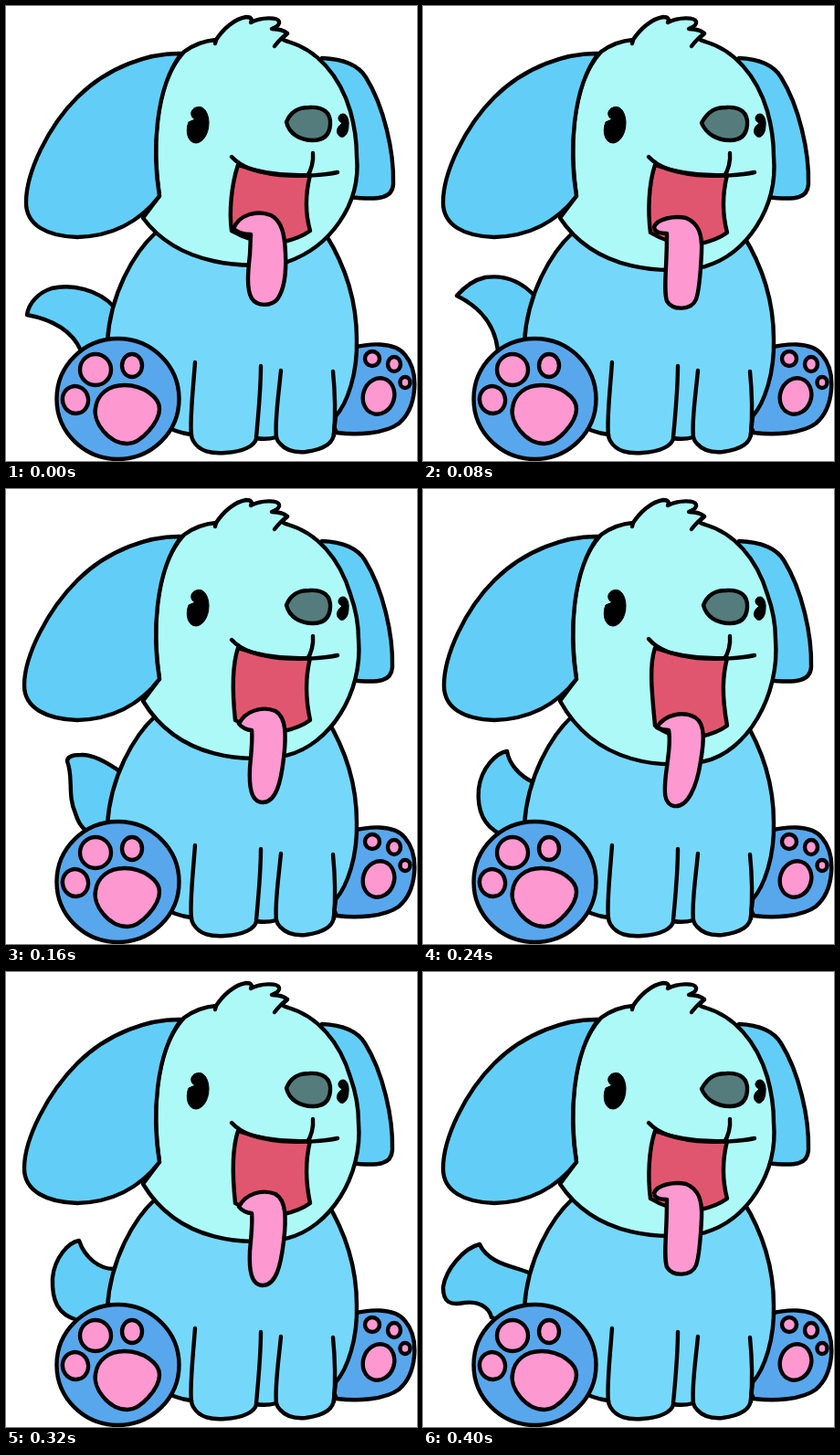
An HTML page for the animation above (0.48 s loop, 450 by 498 pixels).

```html
<!DOCTYPE html>
<html lang="en">
<head>
<meta charset="utf-8">
<title>Happy puppy</title>
<style>
  html, body { margin: 0; width: 100%; height: 100%; overflow: hidden; background: #fff; }
  svg { display: block; width: 100%; height: 100%; stroke: #000; stroke-width: 4.4; stroke-linecap: round; stroke-linejoin: round; }
</style>
</head>
<body>
<svg id="stage" viewBox="0 0 450 498"></svg>
<script>
const STEP = 80;
const JAW = [0, 1, 2, 3, 2, 1];
const EAR = '#62cef7', BODY = '#75d8fa', HEAD = '#adf9f8', PAW = '#58a7ec',
      PINK = '#fd98d0', MOUTH = '#e1566f', NOSE = '#547c7c';

const TAILS = [
  'M118 329C101 310 72 304 50 309C35 314 25 325 23 338C50 343 72 355 82 377',
  'M122 317C108 302 90 294 68 297C55 300 45 308 37 317C55 326 78 342 82 377',
  'M126 310C112 300 95 290 82 291C73 291 67 293 67 298C74 315 67 335 76 355C80 368 85 372 90 376',
  'M121 321C105 314 94 300 92 287C80 289 64 305 61 328C59 350 65 368 85 378',
  'M120 325C102 326 86 312 80 294C68 296 53 313 51 335C50 360 57 375 78 381',
  'M118 330C100 322 72 320 62 298C45 302 25 325 22 345C22 362 30 365 45 362C60 360 72 366 75 378'
];
const TONGUES = [
  'M249 244C255 228 275 223 290 229C302 235 305 250 306 270C307 290 305 310 297 321C290 329 275 329 269 320C263 310 265 290 267 272L268 250C262 250 256 249 249 244',
  'M253 242C256 233 275 229 288 232C302 238 306 250 305 270C304 290 303 310 299 321C294 333 274 334 267 323C263 310 267 290 267 249C260 249 253 248 253 242',
  'M255 257C262 243 280 237 295 243C307 250 307 270 304 295C301 320 296 343 281 343C268 343 266 325 267 305C269 285 270 272 269 264C264 264 258 261 255 257',
  'M256 261C265 246 285 243 298 250C309 257 308 275 304 298C300 325 290 349 275 347C263 345 264 330 266 312C269 290 271 275 269 264C264 264 260 263 256 261'
];

const path = (d, fill = 'none', extra = '') => `<path d="${d}" fill="${fill}" ${extra}/>`;
const oval = (x, y, rx, ry, fill = PINK, turn = 0) =>
  `<ellipse cx="${x}" cy="${y}" rx="${rx}" ry="${ry}" fill="${fill}" transform="rotate(${turn} ${x} ${y})"/>`;

const backPaw =
  path('M380 374C395 370 425 366 437 382C453 401 450 440 430 457C415 468 385 470 362 467L350 440', PAW) +
  oval(401, 386, 8, 8) + oval(425, 392, 7, 8) + oval(437, 412, 5.5, 6) + oval(408, 427, 17, 20, PINK, 18);

const body =
  path('M164 248C140 270 114 315 111 368L120 440L186 465Q194 468 203 469Q203 473 205 476C212 488 225 490 240 489' +
       'C260 488 273 481 274 473Q285 475 296 472Q297 476 300 479C306 486 315 489 328 488C350 485 359 478 359 467' +
       'L361 449C374 434 385 402 384 365C384 325 372 285 350 250Z', BODY) +
  path('M207 390C204 430 201 455 203 470M279 394C279 420 276 450 274 472M301 399C298 430 294 455 296 472M358 400C360 420 361 445 359 470');

const frontPaw =
  oval(122.5, 430, 67, 66, PAW) + oval(98, 398, 17, 17) + oval(138, 393.5, 11, 12.5) + oval(76, 431, 14, 15, PINK, -15) +
  path('M98 440C100 425 112 415 130 415C150 415 168 428 168 441C168 455 148 479 133 479C112 479 95 455 98 440Z', PINK);

const eyes =
  path('M206 112C216 106 222 117 222 128C222 142 214 150 208 150C199 150 196 137 200 127L207 124C202 122 201 115 206 112Z' +
       'M366 119C372 115 376 123 375 131C375 140 370 145 366 143C361 140 362 134 365 131L368 128C363 126 363 121 366 119Z',
       '#000', 'stroke-width="1"');

function head(k) {
  const chin = 284 + 5 * k + k * k / 3;
  const right = k < 2 ? 384 : 386;
  const ear = [22, 22, 20, 23][k];
  const flop = [0, -2, -1, 1][k];
  const low = [246, 248, 253, 259][k];
  const left = [247, 249, 251, 254][k];
  const lip = k < 3 ? 165 : 164;
  const noseTip = k == 1 ? '305 128' : '307 127';
  return path(`M346 57C370 58 ${386 + flop} 65 ${394 + flop} 78C${414 + flop} 110 ${425 + flop} 160 ${424 + flop} 195C${423 + flop} 210 410 213 376 209`, EAR) +
    path('M168 208C160 150 163 85 195 50C206 42 217 38 230 37C238 25 250 14 263 12C268 12 270 14 268 18C280 12 297 12 299 17' +
         `C300 20 296 23 291 25C300 25 306 28 308 30L302 36Q305 38 309 39C340 48 365 75 377 115Q${right} 140 ${right} 165` +
         `C${right + 5} ${218 + 3 * k} 354 ${264 + 8 * k} 308 ${chin - 4}C265 ${chin + 4} 190 ${286 + 6 * k} 150 232Z`, HEAD) +
    path('M230 37L229 41M308 30Q301 35 294 44') +
    path(`M192 52C158 51 112 66 78 100C46 132 ${ear} 182 ${ear} 215C${ear} 240 45 252 78 253C115 252 145 238 168 208C160 160 163 90 192 52Z`, EAR) +
    eyes +
    path(`M${noseTip}C312 115 320 111 332 111C348 110 356 117 355 130C354 142 347 147 336 147C322 147 310 140 ${noseTip}Z`, NOSE) +
    path(`M254 174C247 195 ${left - 3} 225 ${left} ${low}Q275 ${low + 16} 304 ${low + 12}Q322 ${low + 8} 333 ${low}C327 225 328 205 333 185Q290 187 254 174Z`, MOUTH) +
    path(`M247 ${lip}C258 177 275 182 300 185C325 187 350 185 363 182M336 161C337 170 334 180 330 186`) +
    path(TONGUES[k], PINK);
}

const stage = document.getElementById('stage');
let shown = -1;
function draw(now) {
  const i = Math.floor(now / STEP) % JAW.length;
  if (i !== shown) {
    shown = i;
    stage.innerHTML = path(TAILS[i] + 'L125 400', EAR) + backPaw + body + frontPaw + head(JAW[i]);
  }
}
const start = performance.now();
function tick() {
  draw(performance.now() - start);
  requestAnimationFrame(tick);
}
tick();
</script>
</body>
</html>
```
